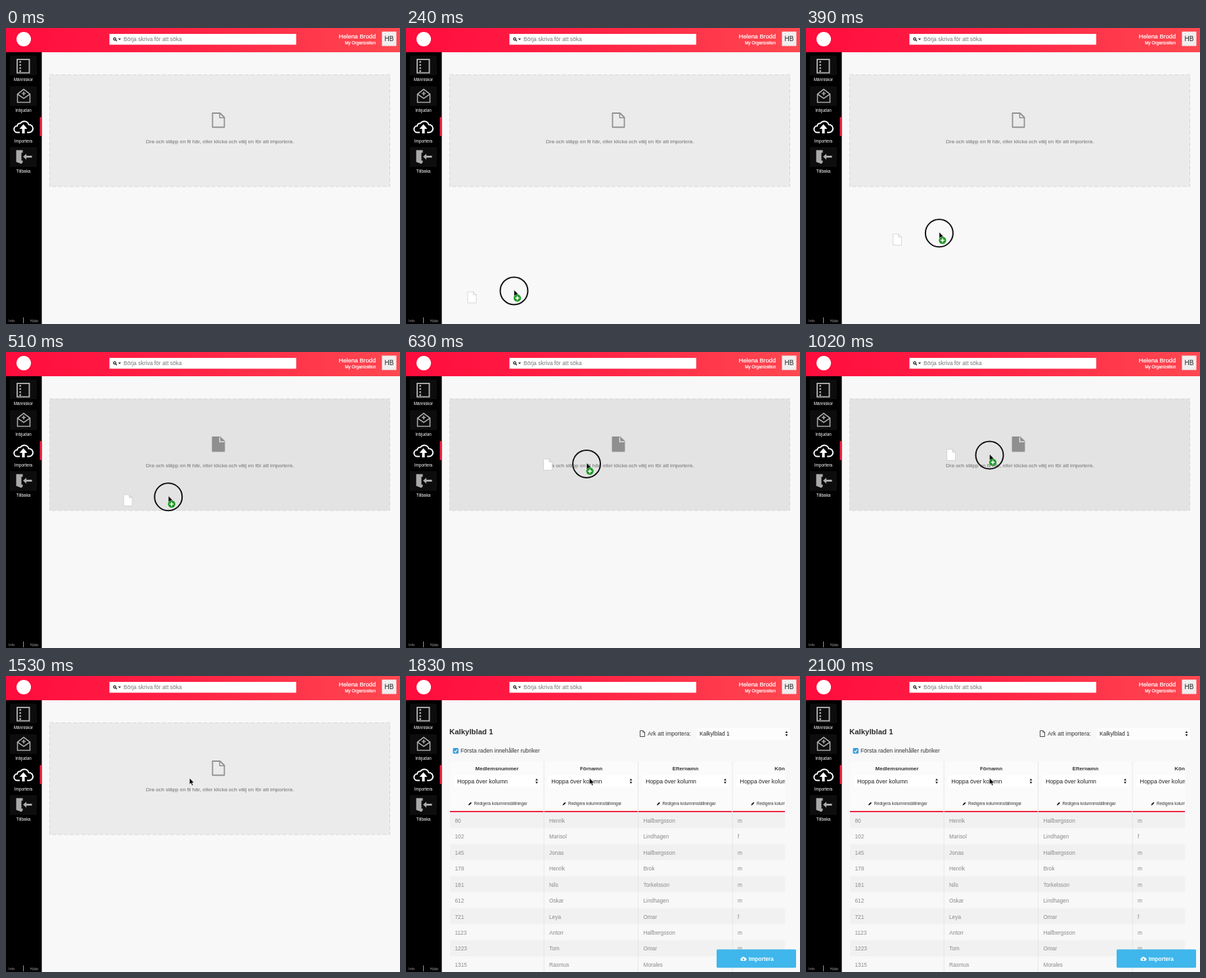
Write an HTML page that moves like this. It is 600 px wide and 452 px high and loops after 2130 ms.

```html
<!DOCTYPE html>
<html lang="sv">
<head>
<meta charset="utf-8">
<style>
html, body { margin: 0; height: 100%; overflow: hidden; background: #f8f8f8; }
svg { display: block; width: 600px; height: 452px; font-family: "Liberation Sans", Arial, sans-serif; }
.mid { text-anchor: middle; }
.end { text-anchor: end; }
.bold { font-weight: bold; }
.line { fill: none; stroke-width: 2; }
</style>
</head>
<body>
<svg viewBox="0 0 600 452">
  <defs>
    <linearGradient id="red">
      <stop offset="0" stop-color="#ff0c3d"/>
      <stop offset=".5" stop-color="#ff2546"/>
      <stop offset="1" stop-color="#ff4850"/>
    </linearGradient>
    <clipPath id="tableClip"><rect x="67" y="130" width="510" height="322"/></clipPath>
  </defs>
  <rect width="600" height="452" fill="#f8f8f8"/>

  <g id="drop">
    <rect id="zone" x="66.5" y="71.5" width="518" height="170.5" stroke="#d6d6d6" stroke-dasharray="6 3"/>
    <path id="page" d="M314.5 130h11.5l6.5 6.5v15h-18z" stroke="#8f8f8f" stroke-width="1.8" stroke-linejoin="round"/>
    <path id="fold" d="M325.5 130v7h7" fill="none" stroke-width="1.5"/>
    <text x="213" y="176.3" font-size="8.03" fill="#858585" stroke="#858585" stroke-width=".15">Dra och släpp en fil här, eller klicka och välj en för att importera.</text>
  </g>

  <g id="sheet"></g>

  <rect width="600" height="37" fill="url(#red)"/>
  <circle cx="27" cy="17" r="11" fill="#fff"/>
  <rect x="157.5" y="9" width="284.500" height="16.500" fill="#fff"/>
  <g stroke="#222" fill="none" stroke-width="1.3"><circle cx="165.500" cy="16.700" r="1.800"/><path d="M167 18.200l1.800 1.800"/></g>
  <path d="M171 16h4l-2 2.500z" fill="#222"/>
  <text x="179" y="20.300" font-size="8.5" fill="#777">Börja skriva för att söka</text>
  <g class="end" fill="#fff" stroke="#fff" stroke-width=".2">
    <text x="563" y="15.500" font-size="9.200">Helena Brodd</text>
    <text x="563" y="25" font-size="6.450">My Organization</text>
  </g>
  <rect x="572.500" y="5.500" width="22" height="22" fill="#f0eeee"/>
  <text class="mid" x="583.500" y="20" font-size="10" fill="#222">HB</text>

  <rect y="37" width="54.500" height="415" fill="#000"/>
  <path d="M6 42h41v30H6zM6 89h41v30H6zM6 182h41v30H6z" fill="#0d0d0d"/>
  <rect x="51.500" y="136" width="3" height="29" fill="#f3203f"/>
  <g class="line" stroke="#aaa">
    <path d="M17 48h18.500v20.500H17z"/>
    <path d="M21.700 50.500v17" stroke-width="2.600" stroke-dasharray="2.500 2.200"/>
    <path d="M17.500 101l9.500-7.500 9.500 7.500v12.500h-19zl9.500 6.500 9.500-6.500M27 97v6M24 100h6" stroke-width="1.600"/>
    <path d="M21 159.500h-3.500a5 5 0 0 1-.5-10 5 5 0 0 1 5-4 7 7 0 0 1 12.500 2 6 6 0 0 1 1 12H32" stroke="#fff"/>
  </g>
  <path d="M26.500 147l6 7h-4v7h-4v-7h-4z" fill="#fff"/>
  <path d="M15.500 186.500h10v4h-2v12h2v2.500l-2 2.500-8-3zM26 196.500l5-4.500v3h8.500v3H31v3z" fill="#aaa"/>
  <g class="mid" font-size="6.400" fill="#fff">
    <text x="26.500" y="81">Människor</text>
    <text x="26.500" y="128">Inbjudan</text>
    <text x="26.500" y="174.500">Importera</text>
    <text x="26.500" y="220.500">Tillbaka</text>
  </g>
  <g font-size="5.700" fill="#999">
    <text x="4" y="449">Info</text><text x="36.500" y="449">Hjälp</text>
    <path d="M26 442h1v9h-1z"/>
  </g>

  <path id="file" d="M-6.500-8.500H2L6.500-4V8.500h-13zM2-8.500V-4h4.500" fill="#fff" stroke="#ccc" stroke-width=".8"/>
  <g id="pointer">
    <path d="M0-1.500v9.500l2.200-2 1.600 3.700 1.600-.7-1.600-3.600h3z" fill="#000" stroke="#fff" stroke-width=".5"/>
    <g id="drag">
      <circle r="21" class="line" stroke="#111"/>
      <circle cx="5" cy="11" r="5.600" fill="#239a2a"/>
      <path d="M2 11h6M5 8v6" stroke="#fff" stroke-width="1.600"/>
    </g>
  </g>
</svg>
<script>
const LOOP = 2130, ENTER = 510, RELEASE = 1200, LOADED = 1650;
const $ = id => document.getElementById(id);
const text = (x, y, size, fill, s, cls = "") =>
  `<text x="${x}" y="${y}" font-size="${size}" fill="${fill}" class="${cls}">${s}</text>`;
const rect = (x, y, w, h, fill) => `<rect x="${x}" y="${y}" width="${w}" height="${h}" fill="${fill}"/>`;
const arrows = (x, y) => `<path d="M${x - 2} ${y - 1}l2-3 2 3zm0 2l2 3 2-3z" fill="#222"/>`;

const rows = `80 Henrik Hallbergsson m
102 Marisol Lindhagen f
145 Jonas Hallbergsson m
178 Henrik Brok m
181 Nils Torkelsson m
612 Oskar Lindhagen m
721 Leya Omar f
1123 Anton Hallbergsson m
1223 Tom Omar m
1315 Rasmus Morales m`.split("\n").map(r => r.split(" "));

function buildSheet() {
  let table = rect(67, 131, 510, 75, "#fbfbfb");
  rows.forEach((row, r) => {
    const y = 208 + r * 24.45;
    table += rect(67, y, 510, 24.45, r % 2 ? "#f8f8f8" : "#f1f1f1");
    row.forEach((cell, c) => table += text(74.5 + c * 143.5, y + 15.8, 8.3, "#8a8a8a", cell));
  });
  ["Medlemsnummer", "Förnamn", "Efternamn", "Kön"].forEach((name, c) => {
    const x = 67 + c * 143.5;
    table += text(x + 71.5, 144, 8, "#333", name, "mid bold")
      + rect(x + 6, 151.5, 131, 18.5, "#fff") + arrows(x + 132, 160.5)
      + text(x + 11, 163.6, 8.9, "#222", "Hoppa över kolumn")
      + `<path d="M${x + 28} 197.500l.6-2 3-3 1.400 1.400-3 3z" fill="#222"/>`
      + text(x + 36.5, 197, 6.3, "#333", "Redigera kolumninställningar")
      + rect(x, 206, 142.5, 2, "#ee2340")
      + rect(x + 142.7, 131, .8, 321, "#e2e2e2");
  });
  $("sheet").innerHTML = text(66, 89, 11.4, "#2b2b2b", "Kalkylblad 1", "bold")
    + `<path d="M356.500 83.500h4.500l2.500 2.500v6.500h-7zM361 83.500v2.500h2.500" fill="none" stroke="#333" stroke-width=".9"/>`
    + text(368, 91, 8.6, "#333", "Ark att importera:")
    + rect(443, 79, 142, 18, "#fdfdfd") + text(447, 91, 8.5, "#222", "Kalkylblad 1") + arrows(579.5, 88)
    + `<rect x="71.500" y="110" width="8.500" height="8.500" rx="1.500" fill="#3a9bdc"/>`
    + `<path d="M73.500 114.300l1.800 2 3-4" fill="none" stroke="#fff" stroke-width="1.200"/>`
    + text(83, 117.3, 8.67, "#333", "Första raden innehåller rubriker")
    + `<g clip-path="url(#tableClip)">${table}</g>`
    + `<rect x="473" y="417.500" width="121" height="28" rx="1.500" fill="#3fb6ec"/>`
    + `<path d="M511 435a2.200 2.200 0 0 1 0-4.300 2.700 2.700 0 0 1 5-.5 2.400 2.400 0 0 1 .5 4.800z" fill="#fff"/>`
    + `<path d="M513.700 430.800l2 2.200h-1.300v1.500h-1.400V433h-1.300z" fill="#3fb6ec"/>`
    + text(522, 434.7, 8.2, "#fff", "Importera", "bold");
}

// time, pointer x, pointer y, file offset x, file offset y
const path = [
  [90, 126, 490, -64, 10],
  [390, 202.5, 314, -64, 10],
  [540, 258, 199, -61, 4],
  [630, 275, 171, -59, 1],
  [780, 278.5, 160, -58, 0],
  [1020, 279.5, 157.5, -58.5, -.5]
];

function poseAt(t) {
  const i = path.findIndex(p => p[0] >= t);
  if (i < 0) return path[path.length - 1];
  if (i == 0) return path[0];
  const a = path[i - 1], b = path[i], k = (t - a[0]) / (b[0] - a[0]);
  return a.map((v, j) => v + (b[j] - v) * k);
}

const show = (id, on) => $(id).style.display = on ? "" : "none";

function draw(now) {
  const t = now % LOOP, [, x, y, dx, dy] = poseAt(t);
  const dragging = t < RELEASE, hover = dragging && t >= ENTER;
  show("drop", t < LOADED);
  show("sheet", t >= LOADED);
  show("drag", dragging);
  show("file", dragging);
  $("pointer").setAttribute("transform", `translate(${x} ${y})`);
  $("file").setAttribute("transform", `translate(${x + dx} ${y + dy})`);
  $("zone").setAttribute("fill", hover ? "#e3e3e3" : "#ebebeb");
  $("page").setAttribute("fill", hover ? "#8f8f8f" : "none");
  $("fold").setAttribute("stroke", hover ? "#e3e3e3" : "#8f8f8f");
  requestAnimationFrame(() => draw(performance.now() - start));
}

buildSheet();
const start = performance.now();
draw(0);
</script>
</body>
</html>
```
